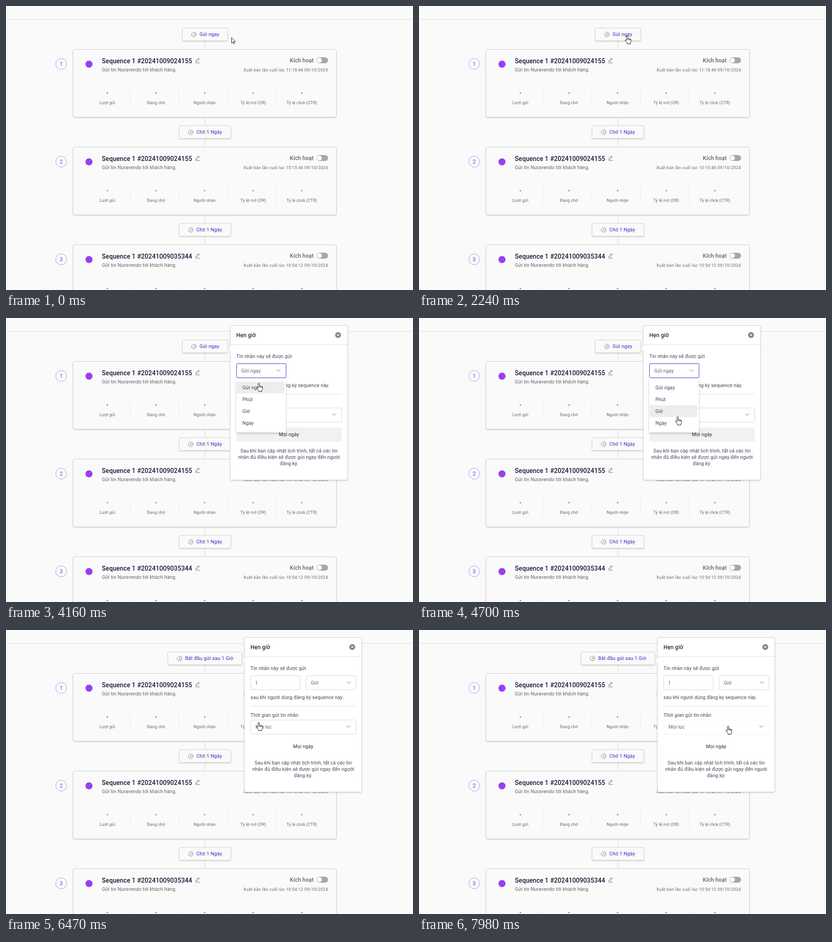
An HTML page for the animation above (8 s loop, 896 px wide and 625 px high).

```html
<!DOCTYPE html>
<html lang="vi">
<head>
<meta charset="utf-8">
<style>
html, body { margin: 0; width: 100%; height: 100%; overflow: hidden; background: #fafafa; }
svg { display: block; width: 896px; height: 625px; font-family: Roboto, sans-serif; }
text { white-space: pre; }
.title { font-size: 14px; font-weight: 500; letter-spacing: .08px; fill: #171b36; }
.body { font-size: 10.71px; letter-spacing: .115px; }
.date { font-size: 9.18px; letter-spacing: .306px; fill: #666; }
.label { font-size: 9.18px; letter-spacing: .12px; fill: #666; }
.head { font-size: 12.24px; font-weight: 500; letter-spacing: .115px; }
.mid { text-anchor: middle; }
.end { text-anchor: end; }
.gray { fill: #626262; }
.ink { fill: #41465a; }
.dark { fill: #252a3d; }
.purple { fill: #4a1fbd; letter-spacing: .19px; }
.violet { fill: #7440ee; font-weight: 400; }
.box { fill: #fff; stroke: #d6d6d6; }
.hover { stroke: #f2f2f2; }
.focus { stroke: #4a2bd0; }
.line { fill: none; stroke: #dedede; }
.link { stroke: #b5b5b5; stroke-dasharray: 2.5 2; }
.icon { fill: none; stroke: #6f6f6f; stroke-linecap: round; stroke-linejoin: round; }
</style>
</head>
<body>
<svg id="stage" viewBox="0 0 896 625">
  <defs>
    <filter id="soft" x="-20%" y="-20%" width="140%" height="150%">
      <feDropShadow dx="0" dy="2" stdDeviation="2.6" flood-color="#000" flood-opacity=".22"/>
    </filter>
    <filter id="low" x="-10%" y="-20%" width="120%" height="160%">
      <feDropShadow dx="0" dy="1.5" stdDeviation=".8" flood-color="#000" flood-opacity=".14"/>
    </filter>
  </defs>
</svg>
<script>
const LOOP = 8000, OPEN = 2670, FOCUS = 3800, MENU = 3920, PICK = 6470, SETTLED = 6620;
const ITEMS = ['Gửi ngay', 'Phút', 'Giờ', 'Ngày'];
const ROW = 26, MENU_TOP = 140, GAP = 215, SHIFT = 31.3;

const text = (x, y, cls, str) => `<text x="${x}" y="${y}" class="${cls}">${str}</text>`;
const rect = (x, y, w, h, cls, more = '') =>
  `<rect x="${x}" y="${y}" width="${w}" height="${h}" rx="2" class="${cls}" ${more}/>`;
const lines = (list, x, y, step, cls) =>
  list.map((str, i) => text(x, y + i * step, cls, str)).join('');
const chevron = (x, y) => `<path class="icon" d="M${x - 4} ${y - 2}l4 4 4-4"/>`;

const clock = (x, y) => `<g class="icon" transform="translate(${x} ${y})">
  <path d="M0-5.2A5.2 5.2 0 1 1-5.2 0M0-2.6V.6H2.6"/>
  <path d="M-5-1.7A5.2 5.2 0 0 1-1.2-5" stroke-dasharray="1 1.6"/></g>`;

function delay(row, w, label, id = '') {
  const x = 438 - w / 2, y = 48 + row * GAP;
  return `<g id="${id}">${rect(x, y + .5, w, 28, '', 'fill="#fafafa" stroke="#d0d0d0" filter="url(#low)"')}
    ${clock(x + 25.5, y + 14.5)}${text(x + 38, y + 18, 'body purple', label)}</g>`;
}

function stat(label, i) {
  const x = 223.3 + i * 107;
  const rule = i < 4 ? `<path d="M${x + 50.2} 183v38" stroke="#ebebeb"/>` : '';
  return text(x, 195.5, 'head mid dark', '-') + text(x, 215.5, 'label mid', label) + rule;
}

function card(i, id, stamp) {
  const labels = ['Lượt gửi', 'Đang chờ', 'Người nhận', 'Tỷ lệ mở (OR)', 'Tỷ lệ click (CTR)'];
  return `<g transform="translate(0 ${i * GAP})">
    <path class="link" d="M438 77v18M438 246v18"/>
    <rect x="147.5" y="95.5" width="580" height="149" rx="4" fill="#fafafa" stroke="#cfcfcf" filter="url(#low)"/>
    <circle cx="121.5" cy="127.5" r="12" fill="#fafafa" stroke="#a993f5"/>
    ${text(121.5, 132, 'head mid violet', i + 1)}
    <circle cx="182.7" cy="128" r="7.8" fill="#9a3df5"/>
    ${text(211, 125.5, 'title', 'Sequence 1 #' + id)}
    <path class="icon" d="M418 122.5l.5-2.5 5.2-5.2 2 2-5.2 5.2zM422.4 116l2 2M417.5 125h9"/>
    ${text(211, 143.5, 'body gray', 'Gửi tin Nuravendo tới khách hàng.')}
    ${text(677.5, 124, 'head gray end', 'Kích hoạt')}
    <rect x="684" y="113" width="25" height="13" rx="6.5" fill="#a6a6a6"/>
    <circle cx="690" cy="119.5" r="5.8" fill="#fff" stroke="#a6a6a6" stroke-width=".8"/>
    ${text(708.8, 143.5, 'date end', `Xuất bản lần cuối lúc ${stamp} 09/10/2024`)}
    ${labels.map(stat).join('')}</g>`;
}

function popup() {
  const note = ['Sau khi bạn cập nhật lịch trình, tất cả các tin',
    'nhắn đủ điều kiện sẽ được gửi ngay đến người', 'đăng ký.'];
  return `<g id="popup">
    <rect x="493.5" y="16.5" width="258.5" height="340" rx="3" fill="#fff" stroke="#cfcfcf" filter="url(#low)"/>
    <path d="M494.5 61.5l-5.5 5.5 5.5 5.5" fill="#fff" stroke="#e2e2e2"/>
    <path class="line" d="M494 58.5h258M507 167.5h232"/>
    ${text(507, 42, 'head dark', 'Hẹn giờ')}
    <circle cx="731" cy="37.5" r="6.5" fill="#858585"/>
    <path d="M729 35.5l4 4m0-4l-4 4" stroke="#fff" stroke-width="1.2"/>
    ${text(507, 88, 'body ink', 'Tin nhắn này sẽ được gửi')}
    ${rect(507.5, 100.5, 109, 31, 'box', 'id="unit"')}
    <g id="nowValue">${text(518, 119.5, 'body gray', 'Gửi ngay')}${chevron(600, 115.5)}</g>
    <g id="hourValue">${text(517, 119.5, 'body gray', '1')}
      ${rect(629.5, 100.5, 109.5, 31, 'box', 'id="hour"')}
      ${text(640, 119.5, 'body gray', 'Giờ')}${chevron(723, 115.5)}</g>
    ${text(507, 151.5, 'body ink', 'sau khi người dùng đăng ký sequence này.')}
    ${text(507, 190.5, 'body ink', 'Thời gian gửi tin nhắn')}
    ${rect(507.5, 198, 231.5, 31, 'box', 'id="period"')}
    ${text(518, 217, 'body gray', 'Mọi lúc')}${chevron(722.5, 212.5)}
    ${rect(507, 241, 232, 31, '', 'id="daily" fill="#f0f1f2"')}
    ${text(623, 260, 'body mid dark', 'Mọi ngày')}
    ${lines(note, 623, 295.5, 14, 'body mid ink')}</g>`;
}

function menu() {
  return `<g id="menu"><rect x="507" y="134" width="109" height="118" rx="2" fill="#fff" filter="url(#soft)"/>
    ${rect(508, MENU_TOP, 104.7, ROW, '', 'id="row" fill="#ededed"')}
    ${lines(ITEMS, 520.5, MENU_TOP + 17, ROW, 'body ink')}</g>`;
}

const stage = document.getElementById('stage');
stage.insertAdjacentHTML('beforeend', `
  <rect width="896" height="625" fill="#fafafa"/>
  <path class="line" d="M0 29.5h896"/>
  ${card(0, '20241009024155', '11:18:44')}
  ${card(1, '20241009024155', '10:15:46')}
  ${card(2, '20241009035344', '10:54:12')}
  ${delay(0, 100, 'Gửi ngay', 'sendNow')}${delay(0, 163, 'Bắt đầu gửi sau 1 Giờ', 'sendLater')}
  ${delay(1, 114, 'Chờ 1 Ngày')}${delay(2, 114, 'Chờ 1 Ngày')}
  ${popup()}${menu()}
  <g id="cursor" fill="#fff" stroke="#111" stroke-linejoin="round">
    <path id="arrow" d="M.5 .5v12.2l2.8-2.6 1.9 4.2 1.9-.8-1.8-4.1h3.8z"/>
    <path id="hand" transform="translate(-6 0)" d="M4 2a1.5 1.5 0 0 1 3 0v5q1.3-.9 2.5.3 1.3-.8 2.4.5 1.5-.5 1.8 1v4q0 2-1.5 4v1.7H5.5V17L1 11.3q-.9-1.6.8-2 1.2.2 2.2 1.8zM7 7v3M9.5 7.3V10M11.9 7.8V10.3"/>
  </g>`);

const el = {};
stage.querySelectorAll('[id]').forEach(node => { if (node.id) el[node.id] = node; });

// The pointer eases between these stops, sampled once per tick.
const TICK = 136.8, FIRST = 1400;
const STOPS = [
  { n: 1, x: 496, y: 69 },
  { n: 6, x: 459, y: 65 },
  { n: 10, x: 459, y: 65 },
  { n: 15, x: 550, y: 114 },
  { n: 18, x: 552, y: 117 },
  { n: 24, x: 570, y: 217 },
  { n: 26, x: 569, y: 237 },
  { n: 30, x: 559, y: 180 },
  { n: 35, x: 555, y: 203 },
  { n: 38, x: 558, y: 203 },
  { n: 43, x: 708, y: 115 },
  { n: 48, x: 681, y: 211 }
];

function pointer(t) {
  const n = Math.floor((t - FIRST) / TICK);
  const next = STOPS.findIndex(stop => stop.n > n);
  if (next < 0) return STOPS[STOPS.length - 1];
  if (next === 0) return STOPS[0];
  const a = STOPS[next - 1], b = STOPS[next];
  const k = (n - a.n) / (b.n - a.n), e = k * k * (3 - 2 * k);
  return { x: a.x + (b.x - a.x) * e, y: a.y + (b.y - a.y) * e };
}

const show = (node, on) => node.setAttribute('display', on ? 'inline' : 'none');
const style = (node, state) => node.setAttribute('class', 'box ' + state);
const hover = on => on ? 'hover' : '';

function draw(t) {
  const { x, y } = pointer(t);
  const picked = t >= PICK, shown = t >= OPEN, opened = t >= MENU && !picked;
  const shift = picked ? SHIFT : 0;
  const over = (l, top, w, h) => x - shift >= l && x - shift <= l + w && y >= top && y <= top + h;

  const onButton = !picked && over(388, 48, 100, 29);
  const onUnit = shown && !picked && over(507, 100, 110, 32);
  const onHour = picked && over(629, 100, 110, 32);
  const onPeriod = picked && over(507, 198, 232, 31);
  const onMenu = opened && over(507, MENU_TOP, 109, ROW * ITEMS.length - 1);

  show(el.sendNow, !picked);
  show(el.sendLater, picked);
  show(el.popup, shown);
  el.popup.setAttribute('transform', `translate(${shift} 0)`);
  show(el.nowValue, !picked);
  show(el.hourValue, picked);
  show(el.daily, !picked);

  style(el.unit, t >= FOCUS && !picked ? 'focus' : hover(onUnit));
  style(el.hour, hover(onHour));
  style(el.period, hover(onPeriod && t >= SETTLED));

  show(el.menu, opened);
  show(el.row, onMenu);
  el.row.setAttribute('y', MENU_TOP + Math.floor((y - MENU_TOP) / ROW) * ROW);

  const clickable = onButton || onUnit || onHour || onPeriod || onMenu;
  show(el.hand, clickable);
  show(el.arrow, !clickable);
  el.cursor.setAttribute('transform', `translate(${Math.round(x)} ${Math.round(y)})`);
}

const start = performance.now();
function tick() {
  draw((performance.now() - start) % LOOP);
  requestAnimationFrame(tick);
}
tick();
</script>
</body>
</html>
```
